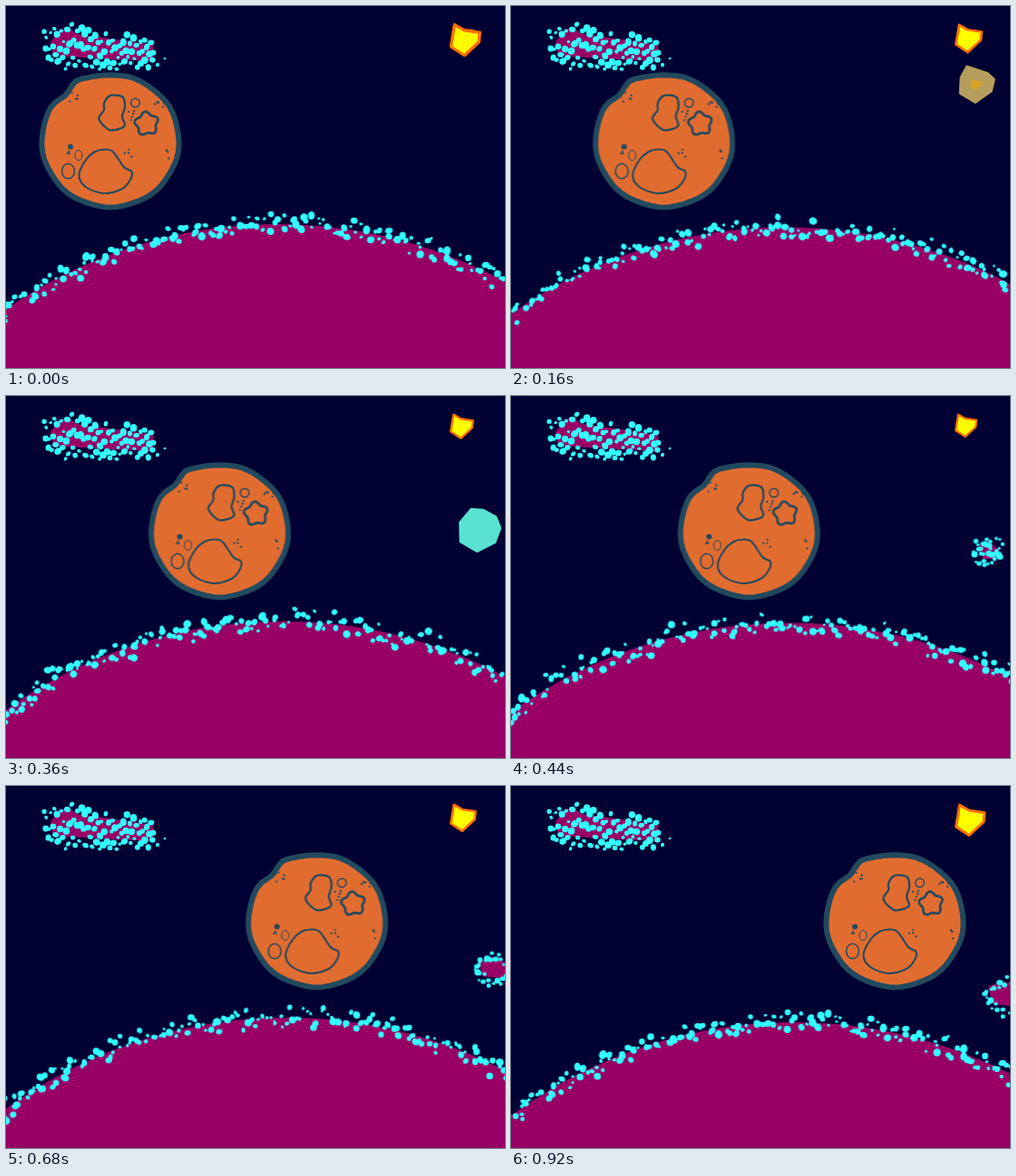
Animation, 550 px wide and 400 px high, one loop 1 s. Source, as an HTML page:

```html
<!DOCTYPE html>
<html lang="en">
<head>
<meta charset="utf-8">
<title>Moon over a spinning planet</title>
<style>
html, body { margin: 0; height: 100%; overflow: hidden; background: #000033; }
svg { display: block; width: 100vw; height: 100vh; }

/* 23 steps of 40 ms, then the last pose holds */
#planet { animation: spin 1s infinite; }
#moon { animation: drift 1s infinite; }
#star { animation: shrink 1s infinite; transform-origin: 489px 19px; }
#shell { animation: shell 1s infinite; }
#core { animation: core 1s infinite; }
#rock { animation: appear 1s infinite; }
#rock path { animation: spread 1s infinite; }
#rock ellipse { animation: scatter 1s infinite; }

@keyframes spin {
  0% { transform: translate(299.5px, 765px) rotate(0deg); animation-timing-function: steps(23); }
  92%, 100% { transform: translate(312.5px, 785px) rotate(-360deg); }
}
@keyframes drift {
  0% { transform: translateX(0); animation-timing-function: steps(23); }
  92%, 100% { transform: translateX(308px); }
}
@keyframes shrink {
  0% { transform: scale(1); animation-timing-function: steps(11); }
  44% { transform: scale(.73); animation-timing-function: steps(12); }
  92%, 100% { transform: scale(1); }
}
@keyframes shell {
  0% {
    d: path("M494 20L505 26L514 27L523 29L522 40L506 55L490 45L492 30Z");
    fill: #ff6600; stroke: #ff6600; visibility: visible;
    animation-timing-function: steps(11);
  }
  44%, 100% {
    d: path("M517 148L531 148L546 157L550 172L543 189L522 198L503 187L502 164Z");
    fill: #33ffff; stroke: #33ffff; visibility: hidden;
  }
}
@keyframes core {
  0% {
    d: path("M496 23L505 28L521 31L520 38L506 52L492 44Z");
    fill: #ffff00; visibility: visible;
    animation-timing-function: steps(7);
  }
  28%, 100% {
    d: path("M517 123L517 123L518 123L518 124L517 124L517 124Z");
    fill: #be5d41; visibility: hidden;
  }
}
@keyframes appear {
  0% { visibility: hidden; animation-timing-function: step-end; }
  44%, 100% { visibility: visible; }
}
@keyframes spread {
  0%, 44% {
    d: path("M516 165L527 161L538 170L535 180L520 180Z");
    animation-timing-function: steps(12);
  }
  92%, 100% { d: path("M526 222L540 216L578 225L578 246L531 241Z"); }
}
@keyframes scatter {
  0%, 44% { transform: var(--from); animation-timing-function: steps(12); }
  92%, 100% { transform: var(--to); }
}
</style>
</head>
<body>
<svg viewBox="0 0 550 400" preserveAspectRatio="none">
  <rect width="550" height="400" fill="#000033"/>

  <g id="planet">
    <circle r="524" fill="#990066"/>
    <path id="crust" fill="#33ffff"/>
  </g>

  <g id="moon" fill="none" stroke="#224a5e" stroke-linejoin="round">
    <path id="disc" fill="#e16c30" stroke-width="6"/>
    <path id="kidney" stroke-width="2.3"/>
    <path id="basin" stroke-width="2.1"/>
    <path id="pit" stroke-width="2.7"/>
    <circle cx="142.5" cy="107" r="4.8" stroke-width="1.5"/>
    <ellipse cx="68.5" cy="182.500" rx="7" ry="8.300" stroke-width="1.5"/>
    <ellipse cx="80" cy="165" rx="4" ry="5.500" stroke-width="1"/>
    <circle cx="71" cy="155.500" r="3" fill="#224a5e" stroke="none"/>
    <path id="specks" fill="#224a5e" stroke="none"/>
  </g>

  <path fill="#990066" d="M49 40L58 27L68 23L78 31L130 38L162 43L163 61L118 59L52 55Z"/>
  <path id="cloud" fill="#33ffff"/>

  <path id="shell" stroke-width="2" stroke-linejoin="round" d="M494 20Z"/>
  <path id="core" d="M496 23Z"/>
  <g id="rock" fill="#33ffff"><path fill="#990066" d="M516 165Z"/></g>

  <path id="star" d="M494.5 21L505 27L522 29.500L521 39.500L505 54.500L490.500 45Z"
        fill="#ffff00" stroke="#ff6f00" stroke-width="3" stroke-linejoin="round"/>
</svg>
<script>
const $ = id => document.getElementById(id);
const draw = (id, d) => $(id).setAttribute('d', d);
const TAU = 2 * Math.PI;

let seed = 41;
const rnd = () => (seed = (seed * 16807) % 2147483647) / 2147483647;
const between = (a, b) => a + (b - a) * rnd();

const repeat = (n, make) => Array.from({ length: n }, (_, i) => make(i)).join('');

// Slightly squashed, tilted dot as a piece of path
function blob(x, y, r) {
  r = Math.round(r * 10) / 10;
  const arc = `a${r} ${r * between(0.75, 1)} ${180 * rnd()} 1 0`;
  return `M${x - r} ${y}${arc} ${2 * r} 0${arc} ${-2 * r} 0`;
}

// Closed outline with a radius that depends on the angle
function outline(cx, cy, radius) {
  const n = 72;
  return 'M' + Array.from({ length: n }, (_, i) => {
    const a = i / n * TAU - Math.PI, r = radius(a);
    return [cx + r * Math.cos(a), cy + r * Math.sin(a)];
  }).join('L') + 'Z';
}

// Closed smooth curve through a few points
function loop(list) {
  const p = list.split(' ').map(s => s.split(',').map(Number)), n = p.length;
  const at = i => p[(i + n) % n];
  return 'M' + p[0] + repeat(n, i => {
    const [a, b, c, e] = [at(i - 1), at(i), at(i + 1), at(i + 2)];
    const c1 = b.map((v, k) => v + (c[k] - a[k]) / 6);
    const c2 = c.map((v, k) => v - (e[k] - b[k]) / 6);
    return `C${c1} ${c2} ${c}`;
  }) + 'Z';
}

// Planet crust: a belt of dots along the rim
const belt = 880;
draw('crust', repeat(belt, i => {
  const a = (i + rnd()) / belt * TAU;
  const r = 524 + (rnd() + rnd() - 1) * 14;
  return blob(r * Math.sin(a), -r * Math.cos(a), between(1.4, 4.2));
}));

// Moon: nearly round, with a notch at the upper left
const bump = (a, centre, width) => Math.exp(-(((a - centre) / width) ** 2));
draw('disc', outline(115, 149, a =>
  74.3 + 1.2 * Math.cos(2 * a) + 0.4 * Math.sin(9 * a)
  - 3.5 * bump(a, -2.36, 0.14) + 2.5 * bump(a, -2.08, 0.12)));
draw('pit', outline(155, 130, a => 11.8 + 1.6 * Math.cos(5 * a + 2.2)));
draw('kidney', loop('108,108 113,100 121,98.5 129,101 131,112 128,122 131,131 127,135 114,137 102.5,125 108,115'));
draw('basin', loop('109,158.5 118,161 130,178 138.5,183 137,192 128,202 108,207 88,200 80.5,187 88,170 98,161'));

const speck = (x, y, n, w, h) =>
  repeat(n, () => blob(x + between(-w, w), y + between(-h, h), 1.1));
draw('specks', speck(74, 98, 8, 7, 10) + speck(166, 113, 6, 9, 8) + speck(138, 120, 5, 4, 6)
  + speck(134, 164, 4, 5, 6) + speck(178, 164, 3, 2, 5) + speck(67, 160, 3, 3, 4));

// Still cloud of dots, top left: its upper edge slopes down to the right
const puffs = 84;
draw('cloud', repeat(puffs, i => {
  const x = 41 + 122 * (i + rnd()) / puffs;
  const top = Math.max(17 + (x - 60) * 0.2, 28 - (x - 41) * 0.5);
  const low = Math.min(70, 50 + (x - 41) * 2);
  const level = (i * 0.618 + 0.15 * rnd()) % 1;
  return blob(x, top + (low - top) * level, between(1.8, 4));
}) + blob(175, 58, 1.4) + blob(167, 65, 2));

// Small rock whose dots move outwards as it sinks off the right edge
for (let i = 0; i < 34; i++) {
  const a = i * 2.4, r = between(1.5, 3.8);
  const dot = document.createElementNS('http://www.w3.org/2000/svg', 'ellipse');
  dot.setAttribute('rx', r);
  dot.setAttribute('ry', r * between(0.75, 1));
  const place = (cx, cy, w, h) =>
    `translate(${cx + w * Math.cos(a)}px, ${cy + h * Math.sin(a)}px)`;
  const near = between(3, 19), far = between(0.55, 1);
  dot.style.setProperty('--from', place(526, 171, near, near));
  dot.style.setProperty('--to', place(551, 233, 36 * far, 24 * far));
  $('rock').append(dot);
}
</script>
</body>
</html>
```
